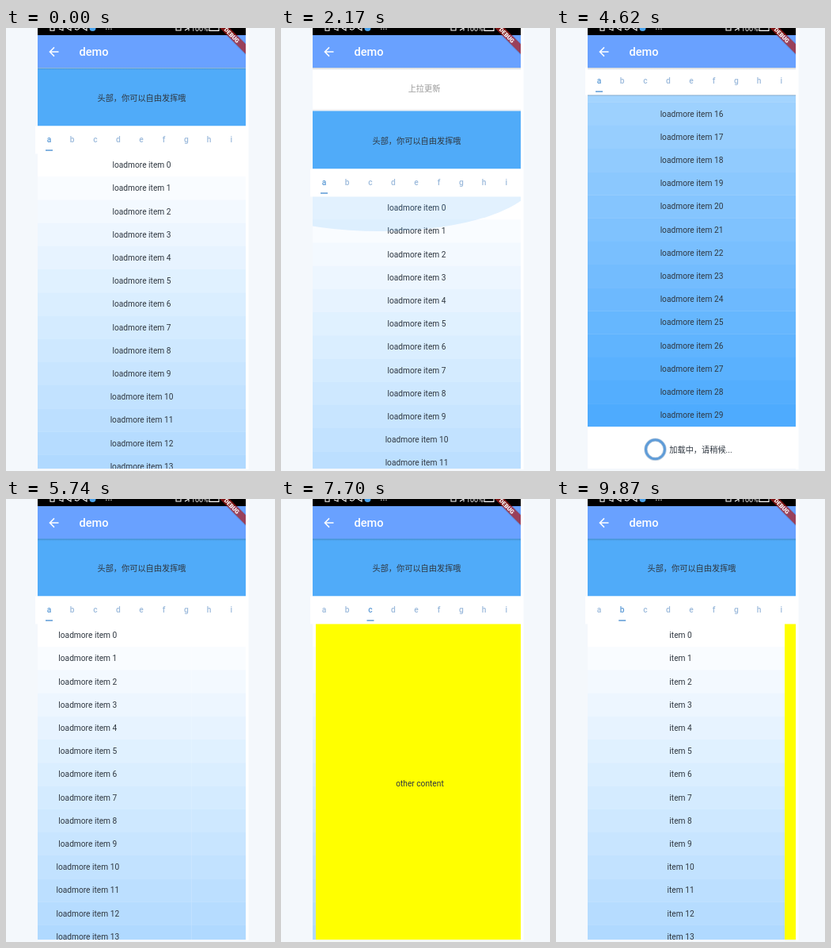
An HTML page for the animation above (9.94 s loop, 340 by 558 pixels).

```html
<!DOCTYPE html>
<html lang="en">
<head>
<meta charset="utf-8">
<title>demo</title>
<style>
  html, body { margin: 0; width: 100%; height: 100%; overflow: hidden; background: #f4f8fc; }
  svg { display: block; width: 340px; height: 558px; }
  text { font: 10.2px Roboto, "Noto Sans CJK SC", "Noto Sans CJK", sans-serif; fill: #2f3740; text-anchor: middle; }
  .hint text { fill: #999; }
  .tabs text { font-weight: 500; fill: #9dbbdc; }
  .tabs text.on { fill: #5d9bd6; }
  .title { font-size: 14.6px; font-weight: 500; fill: #fff; text-anchor: start; }
  .debug { font-size: 7.4px; font-weight: 900; fill: #fff; }
  .battery { font-size: 9px; fill: #fff; text-anchor: start; }
</style>
</head>
<body>
<svg viewBox="0 0 340 558">
  <defs>
    <clipPath id="body"><rect x="40" y="50" width="263" height="505"/></clipPath>
    <clipPath id="screen"><rect x="40" y="0" width="263" height="555"/></clipPath>
    <clipPath id="glowClip"><rect x="40" y="0" width="263" height="80"/></clipPath>
    <linearGradient id="shade" x2="0" y2="1">
      <stop stop-color="#234" stop-opacity=".22"/>
      <stop offset="1" stop-color="#234" stop-opacity="0"/>
    </linearGradient>
  </defs>
  <rect width="340" height="558" fill="#f4f8fc"/>
  <rect x="303" width="3.5" height="556" fill="#fff"/>

  <g clip-path="url(#body)">
    <rect x="40" y="50" width="263" height="505" fill="#fff"/>
    <g id="pages"></g>
    <g id="glow" clip-path="url(#glowClip)">
      <ellipse cx="125" cy="-23" rx="197" ry="67" fill="#2196f3" fill-opacity=".13"/>
    </g>
    <g id="hint" class="hint">
      <path id="arrow" d="M0 5.5V-5M-4.5 -.5L0 -5L4.5 -.5" fill="none" stroke="#999" stroke-width="1.4"/>
      <text id="hintText" y="3"></text>
    </g>
    <g id="header">
      <rect x="40" y="-2" width="263" height="2" fill="#234" opacity=".07"/>
      <rect x="40" width="263" height="73" fill="#50abf9"/>
      <text x="171.5" y="41">头部，你可以自由发挥哦</text>
    </g>
  </g>

  <g id="tabs" class="tabs">
    <rect x="37" width="269" height="35" fill="#fff"/>
    <rect id="line" y="29.8" width="9" height="1.5" fill="#5d9bd6"/>
    <rect id="tabShade" x="40" y="34.5" width="263" height="2.5" fill="url(#shade)"/>
  </g>

  <g clip-path="url(#screen)">
    <rect x="40" y="50" width="263" height="3" fill="url(#shade)"/>
    <rect x="40" y="9" width="263" height="41" fill="#69a1ff"/>
    <rect x="40" width="263" height="9" fill="#000"/>
    <path d="M66.5 30H55.5M61 24.4L55.4 30L61 35.6" fill="none" stroke="#fff" stroke-width="1.5"/>
    <text class="title" x="92.5" y="35">demo</text>
    <g fill="none" stroke="#fff" stroke-width="1.1">
      <path d="M56 0V3.3H61V0M67 1L72 3V0M77 0L82 3V0M87 1Q90 4 93 0M97 0L102 3V0"/>
      <path d="M126 1.2H134" stroke-dasharray="1.5 1.6"/>
      <path d="M215 0V3H221V0M226 3L231 0V3.4M257 0V3.4H269V0"/>
    </g>
    <circle cx="109.5" cy="0" r="4" fill="#4aa3ee"/>
    <text class="battery" x="234" y="3.6">100%</text>
    <g transform="translate(303 -8.5) rotate(45)">
      <rect x="-31" y="19.6" width="62" height="10.4" fill="#000" opacity=".12"/>
      <rect x="-30" y="20.4" width="60" height="8.8" fill="#b71c1c" fill-opacity=".68"/>
      <text class="debug" y="27.5">DEBUG</text>
    </g>
  </g>
</svg>
<script>
const LOOP = 9940, STEP = 70, WIDTH = 263, ROW = 29.2, ROWS = 30, HEADER = 73, TOP = 49.5;
const TAB_X = [54.5, 83.7, 113, 142, 171, 199.5, 228, 256.5, 284.7];

// [time, value] pairs
const PULL = [[0, 1], [330, 50], [630, 0], [1050, 0], [1600, 60], [2030, 60], [2170, 55], [2450, 0],
  [6300, 0], [6720, 48], [6860, 58], [7100, 0]];
const SCROLL = [[2450, 0], [3220, 334.3], [3900, 480], [4250, 530.7], [4950, 530.7], [5460, 0]];
const PAGE = [[5600, 0], [6020, 1], [7150, 1], [7700, 1.985], [7840, 2], [8050, 2], [8500, 3],
  [8700, 3], [9100, 2], [9330, 2], [9870, 1.053], [9940, 1.04]];

const $ = id => document.getElementById(id);
const clamp = (v, lo, hi) => Math.min(hi, Math.max(lo, v));
const move = (el, x, y, extra = '') => el.setAttribute('transform', `translate(${x} ${y}) ${extra}`);

function add(parent, tag, attrs, text) {
  const el = document.createElementNS('http://www.w3.org/2000/svg', tag);
  for (const k in attrs) el.setAttribute(k, attrs[k]);
  if (text) el.textContent = text;
  return parent.appendChild(el);
}

function valueAt(keys, t) {
  if (t <= keys[0][0]) return keys[0][1];
  for (let i = 1; i < keys.length; i++) {
    const [t0, a] = keys[i - 1], [t1, b] = keys[i];
    if (t <= t1) {
      const u = (t - t0) / (t1 - t0);
      return a + (b - a) * u * u * (3 - 2 * u);
    }
  }
  return keys[keys.length - 1][1];
}

function rowColor(i) {
  const u = i / (ROWS - 1);
  return `rgb(${[78, 171, 254].map(c => Math.round(255 + (c - 255) * u))})`;
}

function makeList(label) {
  const g = add($('pages'), 'g', {});
  for (let i = 0; i < ROWS; i++) {
    add(g, 'rect', { x: 40, y: i * ROW, width: WIDTH, height: ROW + 0.3, fill: rowColor(i) });
    add(g, 'text', { x: 171.5, y: i * ROW + 18.2 }, `${label} ${i}`);
  }
  const y = ROWS * ROW;
  add(g, 'rect', { x: 40, y, width: WIDTH, height: 54, fill: '#fff' });
  add(g, 'circle', { cx: 125.5, cy: y + 28.5, r: 12, fill: 'none', stroke: '#c9d6e3', 'stroke-width': 4.6 });
  add(g, 'circle', { cx: 125.5, cy: y + 28.5, r: 12, fill: 'none', stroke: '#5f9cd8', 'stroke-width': 3 });
  add(g, 'text', { x: 183, y: y + 33 }, '加载中，请稍候...');
  return g;
}

function makeOther() {
  const g = add($('pages'), 'g', {});
  add(g, 'rect', { x: 40, y: 0, width: WIDTH, height: 505, fill: '#ff0' });
  add(g, 'text', { x: 171.5, y: 204.5 }, 'other content');
  return g;
}

const pages = [makeList('loadmore item'), makeList('item'), makeOther(), makeOther()];
const tabs = TAB_X.map((x, i) => add($('tabs'), 'text', { x, y: 20.6 }, 'abcdefghi'[i]));

function draw(t) {
  const pull = valueAt(PULL, t), scroll = valueAt(SCROLL, t), page = valueAt(PAGE, t);
  const headY = TOP + pull - Math.min(scroll, HEADER);
  const tabY = headY + HEADER, listY = tabY + 34.5;
  const inner = Math.max(0, scroll - HEADER);
  const current = Math.round(page);

  pages.forEach((g, i) => {
    move(g, (i - page) * WIDTH, listY - (i ? 0 : inner));
    g.style.display = Math.abs(i - page) < 1 ? '' : 'none';
  });
  move($('header'), 0, headY);
  move($('tabs'), 0, tabY);
  $('line').setAttribute('x', TAB_X[current] - 4.5);
  $('tabShade').setAttribute('opacity', inner ? 1 : 0);
  tabs.forEach((el, i) => el.setAttribute('class', i === current ? 'on' : ''));

  move($('glow'), 0, listY);
  $('glow').setAttribute('opacity', clamp((pull - 2) / 35, 0, 1));

  const second = current > 0;
  move($('hint'), 0, TOP + pull / 2);
  $('hint').style.display = pull > 8 ? '' : 'none';
  $('hintText').textContent = second ? '上拉加载' : '上拉更新';
  $('hintText').setAttribute('x', second ? 189 : 181);
  $('arrow').style.display = second ? '' : 'none';
  move($('arrow'), 149, -1, `rotate(${clamp((40 - pull) * 8.1, -180, 0)})`);
}

const start = performance.now();
function tick() {
  const t = (performance.now() - start) % LOOP;
  draw(Math.floor(t / STEP) * STEP);
  requestAnimationFrame(tick);
}
tick();
</script>
</body>
</html>
```
